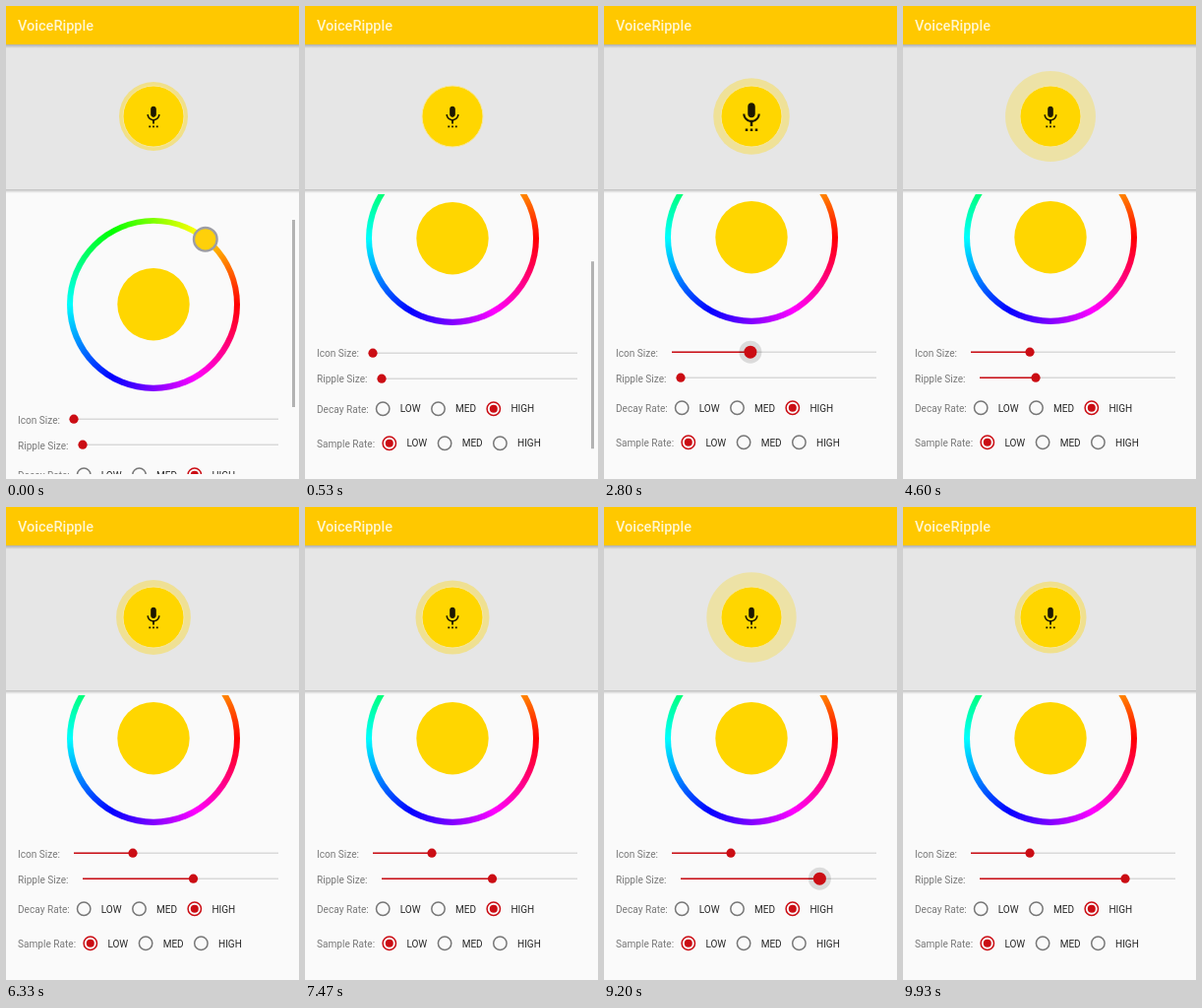
An HTML page that plays this animation: 298 px wide and 480 px high, repeating every 9990 ms.

```html
<!DOCTYPE html>
<html lang="en">
<head>
<meta charset="utf-8">
<style>
  html, body { margin: 0; width: 100%; height: 100%; overflow: hidden; background: #fafafa; }
  body { position: relative; font: 10.1px Roboto, sans-serif; }
  svg, div { position: absolute; left: 0; top: 0; }
  #view { top: 191px; width: 298px; height: 284px; overflow: hidden; }
  #wheel {
    left: 62px; top: 23.7px; width: 176px; height: 176px; border-radius: 50%;
    background: conic-gradient(from 90deg, red, magenta, blue, cyan, lime, yellow, red);
  }
  .label { fill: #7a7a7a; }
  .option { fill: #262626; font-size: 10px; }
  .title { fill: #fff6d0; font-size: 14.5px; font-weight: 500; }
</style>
</head>
<body>
<div id="view">
  <div id="content">
    <div id="wheel"></div>
    <svg id="form" width="298" height="360" viewBox="0 191 298 360">
      <circle cx="150" cy="302.7" r="82" fill="#fafafa"/>
      <circle cx="150" cy="302.7" r="36.7" fill="#ffd600"/>
      <circle cx="202.8" cy="236.8" r="11.8" fill="#ffd00a" stroke="#9d9da3" stroke-width="2.4"/>
    </svg>
  </div>
</div>
<svg width="298" height="480">
  <defs>
    <linearGradient id="shade" x2="0" y2="1">
      <stop stop-opacity=".24"/><stop offset="1" stop-opacity="0"/>
    </linearGradient>
  </defs>
  <rect y="39" width="298" height="147" fill="#e6e6e6"/>
  <rect y="186" width="298" height="4" fill="url(#shade)"/>
  <rect width="298" height="39" fill="#ffc800"/>
  <rect y="39" width="298" height="4" fill="url(#shade)"/>
  <text class="title" x="12" y="24.5">VoiceRipple</text>
  <circle id="ripple" cx="150" cy="112" fill="#ffd600"/>
  <circle cx="150" cy="112" r="31" fill="#ffd600" stroke="#f5e7a6"/>
  <path id="mic" fill="#1d1800" d="M7 24h2v-2H7zM12 13c1.66 0 3-1.34 3-3V4c0-1.66-1.34-3-3-3S9 2.34 9 4v6c0 1.66 1.34 3 3 3zM11 24h2v-2h-2zM15 24h2v-2h-2zM19 10h-1.7c0 3-2.54 5.1-5.3 5.1S6.7 13 6.7 10H5c0 3.41 2.72 6.23 6 6.72V20h2v-3.28c3.28-.49 6-3.31 6-6.72z"/>
  <rect id="bar" x="291" width="3" height="190" fill="#b2b2b2"/>
</svg>
<script>
const LOOP = 9990, SCROLL = 68, RED = '#cb0d14';
const $ = id => document.getElementById(id);

function set(el, attrs) {
  for (const key in attrs) el.setAttribute(key, attrs[key]);
}
function add(tag, attrs, text) {
  const el = document.createElementNS('http://www.w3.org/2000/svg', tag);
  set(el, attrs);
  if (text) el.textContent = text;
  return $('form').appendChild(el);
}

function slider(name, y, start) {
  add('text', { class: 'label', x: 12, y: y + 4.3 }, name);
  const line = { x1: start, x2: 277, y1: y, y2: y, 'stroke-width': 1.5 };
  add('line', { ...line, stroke: '#d9d9d9' });
  const fill = add('line', { ...line, stroke: RED });
  const press = add('circle', { cy: y, r: 11.5, fill: '#000' });
  const thumb = add('circle', { cy: y, fill: RED });
  return (x, held) => {
    set(fill, { x2: x });
    set(press, { cx: x, 'fill-opacity': 0.12 * held });
    set(thumb, { cx: x, r: 4.6 + 1.9 * held });
  };
}

function radios(name, y, start, chosen) {
  add('text', { class: 'label', x: 12, y: y + 4 }, name);
  ['LOW', 'MED', 'HIGH'].forEach((option, i) => {
    const x = start + i * 56.3, on = i === chosen;
    add('circle', { cx: x, cy: y, r: 6.7, fill: 'none', stroke: on ? RED : '#777', 'stroke-width': 1.5 });
    if (on) add('circle', { cx: x, cy: y, r: 4, fill: RED });
    add('text', { class: 'option', x: x + 17.6, y: y + 3.8 }, option);
  });
}

const setIconSize = slider('Icon Size:', 419.2, 69);
const setRippleSize = slider('Ripple Size:', 445.2, 78);
radios('Decay Rate:', 475.7, 79.2, 2);
radios('Sample Rate:', 510.7, 85.8, 0);

const clamp = v => Math.max(0, Math.min(1, v));
const ramp = (t, from, to) => clamp((t - from) / (to - from));
const ease = (t, from, to) => (1 - Math.cos(Math.PI * ramp(t, from, to))) / 2;
const held = (t, from, to) => ramp(t, from - 100, from) * (1 - ramp(t, to, to + 150));

// Each syllable jumps up and then fades away.
const syllables = [-250, 1100, 1950, 2740, 3450, 3950, 4440, 5000, 5500, 5965,
  6550, 7100, 7650, 8230, 8900, 9535];
const loudness = t => Math.max(...syllables.map(s => ramp(t, s, s + 60) * (1 - ramp(t, s, s + 450))));

function draw(t) {
  const scroll = SCROLL * (1 - (1 - ramp(t, 70, 680)) ** 3);
  $('content').style.transform = `translateY(${-scroll}px)`;
  set($('bar'), { y: 217 + scroll * 0.63, opacity: 1 - ramp(t, 1000, 1300) });

  const icon = 69 + 100 * ease(t, 1500, 2200) - 40 * ease(t, 2450, 3150);
  setIconSize(icon, held(t, 1500, 3150));
  const scale = t < 1500 ? 0.94 : Math.max(0.1, (icon - 69) / 64);
  set($('mic'), { transform: `translate(150 112) scale(${scale}) translate(-12 -12)` });

  const size = 57 * ease(t, 3500, 4400) + 55.5 * ease(t, 5150, 6100) + 35.5 * ease(t, 8700, 9400);
  setRippleSize(78 + size, held(t, 3500, 4400) + held(t, 5150, 6100) + held(t, 8700, 9400));
  const radius = 31 + (9 + size / 4) * loudness(t);
  set($('ripple'), { r: radius, 'fill-opacity': 0.28 + 0.15 * ramp(radius, 42, 34) });
}

const begin = performance.now();
function tick() {
  draw((performance.now() - begin) % LOOP);
  requestAnimationFrame(tick);
}
tick();
</script>
</body>
</html>
```
